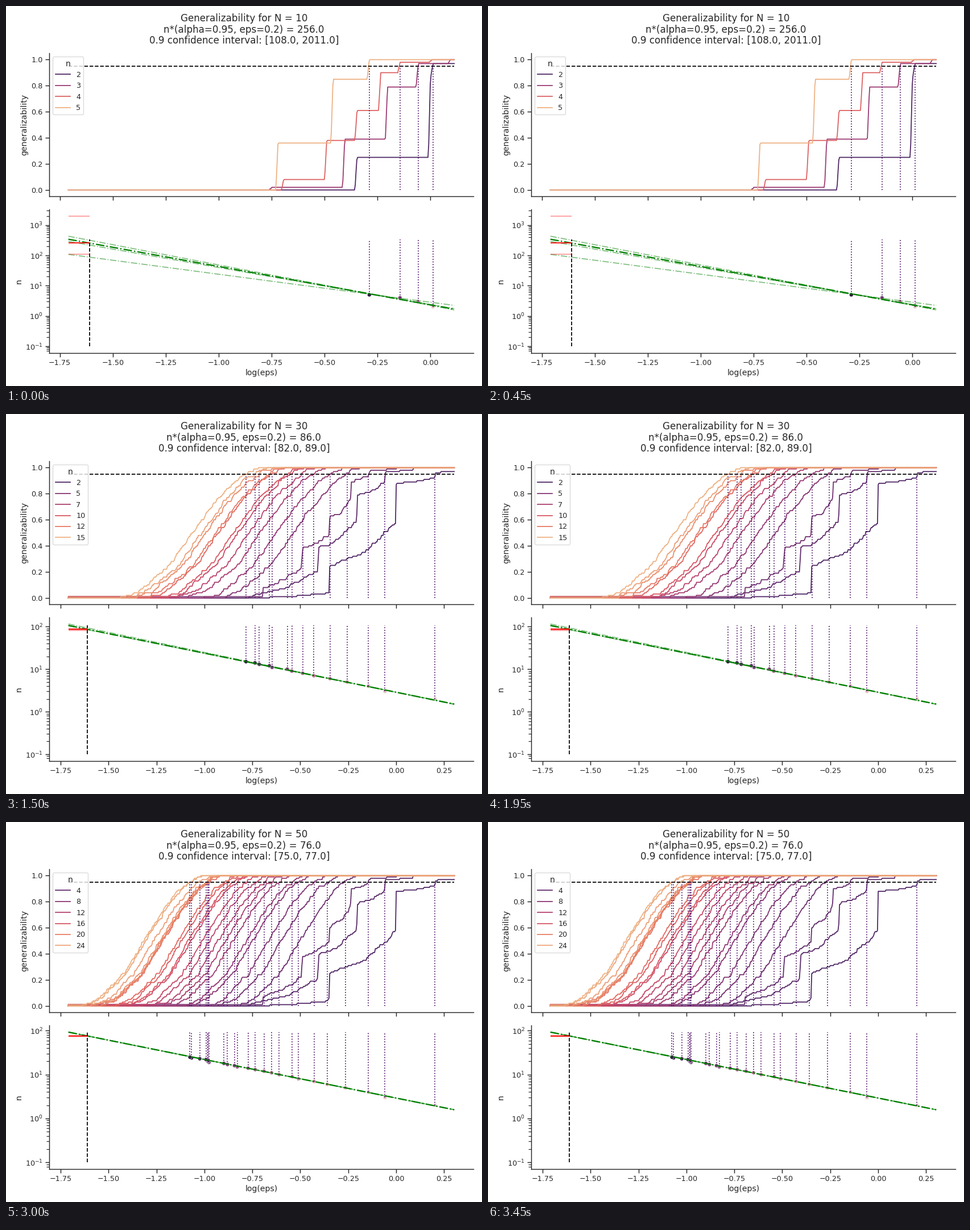
Write a matplotlib script that moves like this. It is 837 px wide and 669 px high and loops after 3750 ms.

```python
import numpy as np
import matplotlib.pyplot as plt
from matplotlib.animation import FuncAnimation
from matplotlib.colors import LinearSegmentedColormap
from matplotlib.lines import Line2D
from matplotlib.ticker import MultipleLocator

W, H = 837, 669
K = 1.1625                      # pixels per style point at 72 dpi
LW = 1.5 * K
INK = "0.15"
VLINE = "#53136a"
X_EPS = np.log(0.2)
X_MIN = X_EPS - 0.1

plt.rcParams.update({
    "font.family": "DejaVu Sans", "font.size": 12 * K,
    "axes.labelsize": 12 * K, "axes.labelpad": 4 * K,
    "axes.linewidth": 1.25 * K, "axes.edgecolor": INK, "axes.labelcolor": INK,
    "text.color": INK, "xtick.color": INK, "ytick.color": INK,
    "xtick.labelsize": 11 * K, "ytick.labelsize": 11 * K,
    "legend.fontsize": 11 * K, "legend.title_fontsize": 12 * K,
    "patch.linewidth": K, "lines.linewidth": LW,
})
for t in ("xtick", "ytick"):
    plt.rcParams.update({
        f"{t}.major.size": 6 * K, f"{t}.major.width": 1.25 * K,
        f"{t}.major.pad": 3.5 * K, f"{t}.minor.size": 4 * K,
        f"{t}.minor.width": K,
    })

CURVE_MAP = LinearSegmentedColormap.from_list("curves", [
    "#4b2362", "#6c2b6d", "#8f3371", "#b13c6c",
    "#d14a61", "#e3685c", "#e98d6b", "#edb081"])

# Small n only allow a few distances, so their curves jump: (log eps, level)
JUMPS = {
    2: [(-0.347, 0.25), (0, 0.88)],
    3: [(-0.75, 0.02), (-0.405, 0.39), (-0.203, 0.79), (-0.058, 0.97)],
    4: [(-0.693, 0.08), (-0.49, 0.38), (-0.347, 0.61), (-0.235, 0.9),
        (-0.144, 0.98)],
    5: [(-0.72, 0.36), (-0.46, 0.85), (-0.289, 1)],
}
# Common outline of the smooth curves, from the median (0) to level 0.95 (1)
LEVELS = [0, 0.05, 0.25, 0.5, 0.75, 0.9, 0.95, 0.99, 1]
SPREAD = [-1.35, -1, -0.42, 0, 0.45, 0.8, 1, 1.15, 1.3]


class Scene:
    def __init__(self, size, n_star, interval, slope, half, step, tilts,
                 last=0.203):
        self.size, self.n_star, self.interval = size, n_star, interval
        self.half = half            # distance from median to level 0.95
        self.last = last            # where n = 2 crosses level 0.95
        self.x_max = last + 0.1
        self.ns = np.arange(2, size // 2 + 1)
        self.keys = [int(step * k) for k in range(1, 7)
                     if 2 <= int(step * k) <= size // 2]
        self.slope = slope
        self.start, self.end = self.fit(X_MIN), self.fit(self.x_max)
        self.faint = [(self.start + d, self.end - d / 4) for d in tilts]
        self.rng = np.random.default_rng(size)
        self.cross = np.array([self.crossing(n) for n in self.ns])
        self.grid = np.linspace(X_MIN, self.x_max, 500)
        self.curves = [self.curve(n, x) for n, x in zip(self.ns, self.cross)]

    def fit(self, x):
        """log10 of n on the regression line."""
        return np.log10(self.n_star) + self.slope * (x - X_EPS)

    def jumps(self, n):
        if n > 4 and self.size > 10:
            return []
        return JUMPS[n] + ([(self.last, 0.965)] if n == 2 else [])

    def crossing(self, n):
        if self.jumps(n):
            return self.jumps(n)[-1][0]
        x = X_EPS + (np.log10(n) - np.log10(self.n_star)) / self.slope
        return x + self.rng.normal(0, 0.001 * n)

    def staircase(self, jumps):
        """Jumps joined by flats, or by ramps when there are many points."""
        jumps = jumps + [(jumps[-1][0] + 0.15, 1)]
        many = self.size > 10
        width = 0.003 if many else 0.01
        pts = [(jumps[0][0] - 0.4, 0)]
        for k, (x, level) in enumerate(jumps):
            x0, y0 = pts[-1]
            rise = many * (0.5 if k else 0.15) * (level - y0)
            pts += [((x0 + x) / 2, y0 + 0.3 * rise),
                    (x - width, y0 + rise), (x, level)]
        return np.array(pts).T

    def curve(self, n, cross):
        """Empirical distribution of 100 samples following the outline."""
        if self.jumps(n):
            x, level = self.staircase(self.jumps(n))
        else:
            x = cross + self.half * (np.array(SPREAD) - 1)
            level = LEVELS
        s = np.interp(np.arange(0.005, 1, 0.01), level, x)
        if self.size > 10:
            gap = np.gradient(s)
            s += self.rng.normal(0, 1.1, 100) * np.where(gap > 0.02, 0, gap)
            if self.size > 20 and n % 4 == 0:
                s[0] = X_MIN - 0.01
        return np.searchsorted(np.sort(s), self.grid, side="right") / 100

    def shade(self, n):
        return (n - 2) / (self.size / 2 - 2)


SCENES = [
    Scene(10, 256, (108, 2011), -1.268, 0.2, 1, [0.1, -0.07, -0.5], 0.012),
    Scene(20, 70, (68, 75), -0.868, 0.21, 1.5, [0.03, -0.01]),
    Scene(30, 86, (82, 89), -0.918, 0.28, 2.5, [0.034, -0.01]),
    Scene(40, 87, (86, 89), -0.918, 0.295, 3, [0.009, -0.002]),
    Scene(50, 76, (75, 77), -0.88, 0.24, 4, [0.003, -0.003]),
]


def dot_color(f):
    """Cubehelix ramp from light (f=0) to dark (f=1)."""
    x = 0.85 - 0.7 * f
    a = 0.8 * x * (1 - x) / 2
    phi = 2 * np.pi * 0.4 * x
    c, s = np.cos(phi), np.sin(phi)
    return (x + a * (-0.14861 * c + 1.78277 * s),
            x + a * (-0.29227 * c - 0.90649 * s),
            x + a * 1.97294 * c)


def add_axes(top):
    x0, w, h = 75.8, 746.3, 252.3
    ax = fig.add_axes([x0 / W, 1 - (top + h) / H, w / W, h / H])
    ax.spines[["top", "right"]].set_visible(False)
    ax.xaxis.set_major_locator(MultipleLocator(0.25))
    return ax


def draw_curves(ax, sc):
    for n, y in zip(sc.ns, sc.curves):
        ax.plot(sc.grid, y, color=CURVE_MAP(sc.shade(n)))
    ax.hlines(0.95, X_MIN, sc.x_max, colors="k", linestyles="dashed", lw=LW)
    ax.vlines(sc.cross, 0, 0.95, colors=VLINE, linestyles="dotted", lw=LW)
    ax.set_ylim(-0.05, 1.05)
    ax.set_ylabel("generalizability")
    ax.tick_params(labelbottom=False)
    keys = [Line2D([], [], color=CURVE_MAP(sc.shade(n))) for n in sc.keys]
    ax.legend(keys, sc.keys, title="n", loc="upper left")


def draw_fit(ax, sc):
    ax.set_yscale("log")
    ax.scatter(sc.cross, sc.ns, s=(6 * K) ** 2, edgecolors="w",
               linewidths=0.48 * K, zorder=1,
               c=[dot_color(sc.shade(n)) for n in sc.ns])
    span = [X_MIN, sc.x_max]
    ax.plot(span, [10 ** sc.start, 10 ** sc.end], "-.", color="green",
            lw=2 * K)
    for a, b in sc.faint:
        ax.plot(span, [10 ** a, 10 ** b], "-.", color="green", alpha=0.5)
    top = 10 ** sc.start
    ax.vlines(sc.cross, sc.ns, top, colors=VLINE, linestyles="dotted", lw=LW)
    ax.vlines(X_EPS, 0.1, top, colors="k", linestyles="dashed", lw=LW)
    ax.hlines(sc.n_star, X_MIN, X_EPS, colors="red", lw=LW)
    ax.hlines(sc.interval, X_MIN, X_EPS, colors="red", lw=LW, alpha=0.4)
    high = max(np.log10(sc.interval[1]), *(a for a, _ in sc.faint))
    pad = 0.05 * (high + 1)
    ax.set_ylim(10 ** (-1 - pad), 10 ** (high + pad))
    ax.set_xlabel("log(eps)")
    ax.set_ylabel("n")


def draw(i):
    fig.clear()
    sc = SCENES[i]
    lo, hi = sc.interval
    fig.suptitle(f"Generalizability for N = {sc.size}\n"
                 f"n*(alpha=0.95, eps=0.2) = {sc.n_star:.1f}\n"
                 f"0.9 confidence interval: [{lo:.1f}, {hi:.1f}]",
                 fontsize=14.4 * K, linespacing=1.1)
    pad = 0.05 * (sc.x_max - X_MIN)
    for top, part in ((83, draw_curves), (358.2, draw_fit)):
        ax = add_axes(top)
        part(ax, sc)
        ax.set_xlim(X_MIN - pad, sc.x_max + pad)
    return fig.axes


fig = plt.figure(figsize=(W / 72, H / 72), dpi=72, facecolor="white")
anim = FuncAnimation(fig, draw, frames=len(SCENES), interval=750, repeat=True)
plt.show()
```
